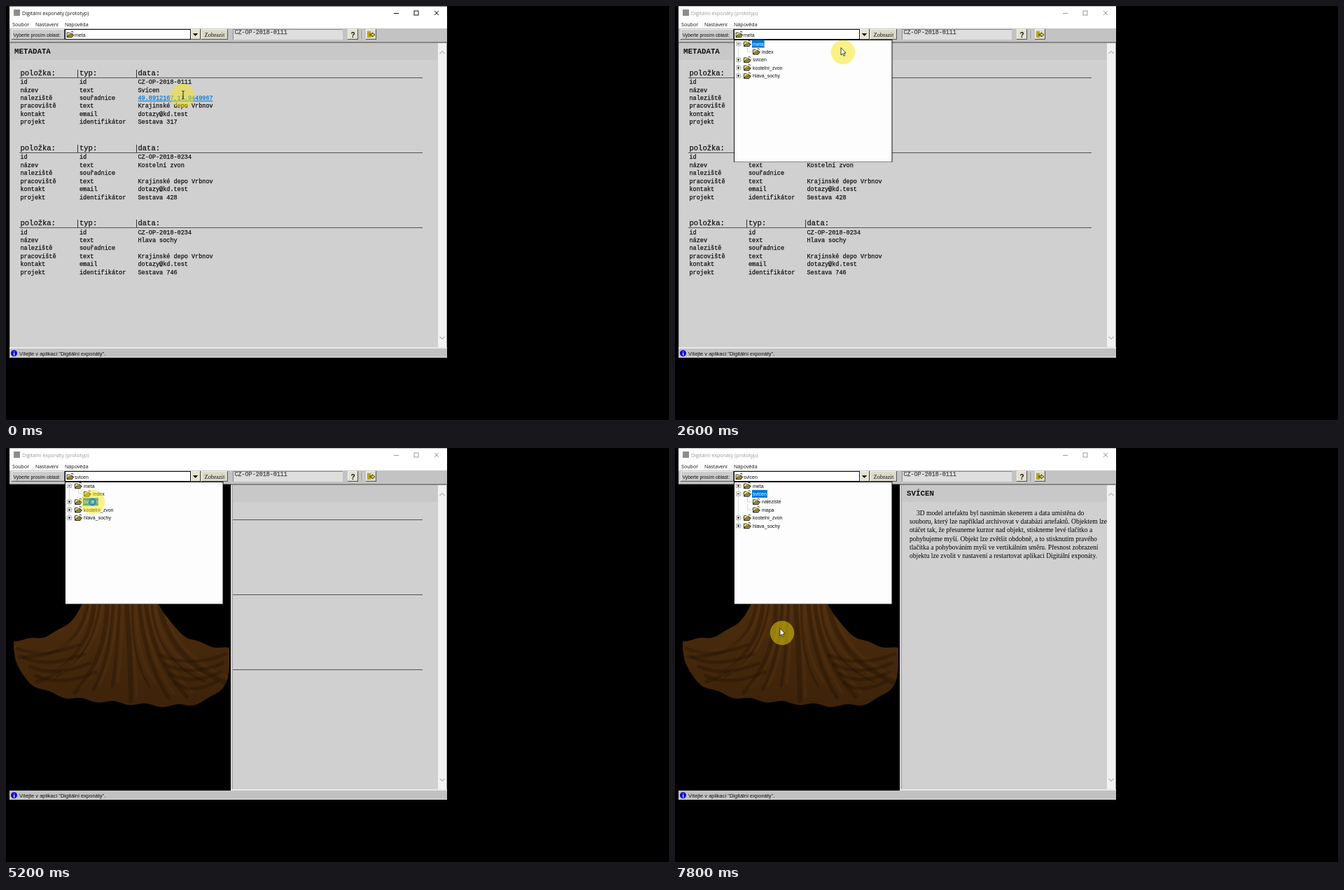
Write an HTML page with a canvas that moves like this. It is 947 px wide and 591 px high and loops after 8 s.

```html
<!DOCTYPE html>
<html lang="cs">
<head>
<meta charset="utf-8">
<title>Digitální exponáty</title>
<style>
html, body { margin: 0; width: 100%; height: 100%; overflow: hidden; background: #000; }
canvas { display: block; }
</style>
</head>
<body>
<canvas id="stage" width="947" height="591"></canvas>
<script>
const ctx = document.getElementById('stage').getContext('2d');
const LOOP = 8000, STEP = 200;
const APP = 'Digitální exponáty';
const SANS = '"Liberation Sans", Arial, sans-serif';
const HUMAN = '"Open Sans", sans-serif';
const SERIF = '"Liberation Serif", serif';
const MONO = '"Liberation Mono", monospace';
const INK = '#111', BLUE = '#0078d7';
const ROW = 11.42;

// Moments of the hard changes
const OPEN = 1400, RELEASE = 2000, SELECT = 4000, PANE = 4400, MODEL = 4600, EXPAND = 5600;

// Pointer stops: time, x, y
const STOPS = [
  [0, 252, 128], [200, 250, 145], [1000, 279, 50], [1800, 279, 50],
  [2600, 240, 66], [3400, 127, 84], [4600, 127, 84], [5200, 124, 77],
  [6200, 124, 77], [7800, 153, 264], [LOOP, 153, 264]
];

const BLOCKS = [
  ['CZ-OP-2018-0111', 'Svícen', '49.8912167,17.9449967', 'Sestava 317'],
  ['CZ-OP-2018-0234', 'Kostelní zvon', '', 'Sestava 428'],
  ['CZ-OP-2018-0234', 'Hlava sochy', '', 'Sestava 746']
];
const FIELDS = [
  ['id', 'id'], ['název', 'text'], ['naleziště', 'souřadnice'],
  ['pracoviště', 'text'], ['kontakt', 'email'], ['projekt', 'identifikátor']
];
const ABOUT = [
  '3D model artefaktu byl nasnímán skenerem a data umístěna do',
  'souboru, který lze například archivovat v databázi artefaktů. Objektem lze',
  'otáčet tak, že přesuneme kurzor nad objekt, stiskneme levé tlačítko a',
  'pohybujeme myší. Objekt lze zvětšit obdobně, a to stisknutím pravého',
  'tlačítka a pohybováním myši ve vertikálním směru. Přesnost zobrazení',
  'objektu lze zvolit v nastavení a restartovat aplikaci ' + APP + '.'
];

function rect(x, y, w, h, color) {
  ctx.fillStyle = color;
  ctx.fillRect(x, y, w, h);
}

function text(str, x, y, size, family, color = INK, weight = '') {
  ctx.font = `${weight} ${size}px ${family}`;
  ctx.fillStyle = color;
  ctx.fillText(str, x, y);
}

// Typewriter text, slightly heavier than regular
function mono(str, x, y, size = 8.5, color = INK) {
  text(str, x, y, size, MONO, color);
  ctx.strokeStyle = color;
  ctx.lineWidth = 0.25;
  ctx.strokeText(str, x, y);
}

function line(points, color, width = 1) {
  ctx.beginPath();
  points.forEach(([x, y]) => ctx.lineTo(x, y));
  ctx.strokeStyle = color;
  ctx.lineWidth = width;
  ctx.stroke();
}

function dotted(points) {
  ctx.setLineDash([1, 1]);
  line(points, '#999', 0.7);
  ctx.setLineDash([]);
}

function poly(points, fill) {
  ctx.beginPath();
  points.forEach(([x, y]) => ctx.lineTo(x, y));
  ctx.closePath();
  ctx.fillStyle = fill;
  ctx.fill();
  ctx.strokeStyle = INK;
  ctx.lineWidth = 0.8;
  ctx.stroke();
}

function disc(x, y, r, color) {
  ctx.beginPath();
  ctx.arc(x, y, r, 0, Math.PI * 2);
  ctx.fillStyle = color;
  ctx.fill();
}

function at(x, y, draw) {
  ctx.save();
  ctx.translate(x, y);
  draw();
  ctx.restore();
}

function bevel(x, w, fill) {
  rect(x, 33, w, 15, '#555');
  rect(x, 33, w - 1, 14, '#f4f4f4');
  rect(x + 1, 34, w - 2, 13, fill);
}

function folder(x, y) {
  at(x, y, () => {
    poly([[-4.5, 3.5], [-4.5, -3], [-1, -3], [0, -2], [3, -2], [3, 3.5]], '#f3ea8c');
    poly([[-4.5, 3.5], [-2, 0], [5.5, 0], [3, 3.5]], '#a99d2c');
    line([[1.5, -4.5], [4, -4.5], [4.5, -3]], INK, 0.7);
  });
}

function titleBar(active) {
  const ink = active ? INK : '#999';
  rect(5, 0, 625, 32, '#fff');
  rect(5, 0, 625, 1, active ? '#777' : '#bbb');
  rect(11, 5, 9, 9, '#8c8c8c');
  text(APP + ' (prototyp)', 23, 12.7, 7.2, HUMAN, ink);
  line([[554, 10.5], [561, 10.5]], ink);
  ctx.strokeRect(583, 7, 6, 6);
  line([[612, 7], [618, 13]], ink);
  line([[618, 7], [612, 13]], ink);
  text('Soubor', 9, 28.5, 7.1, HUMAN);
  text('Nastavení', 42, 28.5, 7.1, HUMAN);
  text('Nápověda', 84, 28.5, 7.1, HUMAN);
}

function toolBar(area, pressed) {
  rect(5, 32, 625, 20, '#c3c3c3');
  rect(5, 51, 625, 2, '#858585');
  bevel(8, 76, '#cbcbcb');
  text('Vyberte prosím oblast:', 10.5, 43.7, 6.75, SANS);
  rect(84, 33, 180, 15, INK);
  rect(85, 34, 178, 13, '#fff');
  folder(91.5, 41);
  text(area, 98, 43.7, 7, SANS);
  bevel(264, 14, pressed ? '#c9c6b0' : '#e6e3cf');
  if (pressed) rect(264, 33, 1, 15, INK);
  at(pressed ? 271.5 : 270.5, pressed ? 41.5 : 41, () =>
    poly([[-3, -1.5], [3, -1.5], [0, 1.5]], INK));
  bevel(279, 38, '#dcd9c8');
  text('Zobrazit', 283.5, 43.5, 8.5, SERIF);
  rect(324, 33, 157, 15, '#8d8d8d');
  rect(325, 34, 156, 14, '#dedede');
  mono('CZ-OP-2018-0111', 326.5, 40.3, 8.4, '#444');
  bevel(488, 15, '#e4e1cf');
  text('?', 492.5, 44.7, 10, SANS, INK, 'bold');
  rect(508, 35, 1, 12, '#888');
  rect(509, 35, 1, 12, '#eee');
  bevel(514, 15, '#dddac8');
  rect(516, 36, 5, 9, '#b5a620');
  poly([[520, 40], [523, 40], [523, 38], [527, 41], [523, 44], [523, 42], [520, 42]], '#f2df35');
}

function contentPane() {
  rect(5, 53, 625, 436, '#a8a8a8');
  rect(6, 53, 611, 434, '#d0d0d0');
  rect(6, 53, 611, 24, '#c8c8c8');
  rect(617, 53, 12, 434, '#f2f2f2');
  line([[619.5, 68], [623, 64.5], [626.5, 68]], '#8c8c8c');
  line([[619.5, 472], [623, 475.5], [626.5, 472]], '#8c8c8c');
}

function metadata() {
  text('METADATA', 12, 67.5, 10.8, MONO, INK, 'bold');
  const columns = [20.5, 105, 188.5];
  BLOCKS.forEach(([id, name, place, project], b) => {
    const top = 95.5 + b * 107.2;
    ['položka:', 'typ:', 'data:'].forEach((label, i) => {
      mono(label, columns[i], top + 3, 10.5);
      if (i) rect(Math.floor(columns[i] - 2.5), Math.round(top - 5), 1, 12, '#333');
    });
    rect(19, Math.round(top + 6), 576, 1, '#555');
    const data = [id, name, place, 'Krajinské depo Vrbnov', 'dotazy@kd.test', project];
    FIELDS.forEach((field, i) => {
      const y = top + 15.7 + i * ROW;
      const link = data[i] && data[i] === place;
      [...field, data[i]].forEach((cell, c) =>
        mono(cell, columns[c], y, 8.5, link && c === 2 ? BLUE : INK));
      if (link) rect(188.5, y + 1.2, 107, 1, BLUE);
    });
  });
}

function about() {
  text('SVÍCEN', 331, 67.5, 10.8, MONO, INK, 'bold');
  ABOUT.forEach((row, i) => text(row, i ? 335 : 345, 96.2 + i * 12.12, 9.5, SERIF, '#000'));
}

// Upper and lower edge of the draped foot, u from -1 (left) to 1 (right)
const footX = u => 165 + 154 * u;
const upperY = u => 215 + 6 * u + 68 * (1 - Math.exp(-5 * Math.max(0, Math.abs(u) - 0.33)));
const lowerY = u => 300 + 12 * u + 64 * Math.sqrt(1 - u ** 4) + 2 * Math.sin(21 * u);

function fold(x0, y0, cx, cy, x1, y1, color, width) {
  ctx.beginPath();
  ctx.moveTo(x0, y0);
  ctx.quadraticCurveTo(cx, cy, x1, y1);
  ctx.strokeStyle = color;
  ctx.lineWidth = width;
  ctx.stroke();
}

function model() {
  ctx.save();
  ctx.beginPath();
  for (let u = -1; u <= 1; u += 1 / 64) ctx.lineTo(footX(u), upperY(u) + 1.5 * Math.sin(24 * u));
  for (let u = 1; u >= -1; u -= 1 / 64) ctx.lineTo(footX(u), lowerY(u));
  ctx.closePath();
  const tone = ctx.createLinearGradient(0, 222, 0, 368);
  tone.addColorStop(0, '#4c2d0d');
  tone.addColorStop(1, '#3d230a');
  ctx.fillStyle = tone;
  ctx.fill();
  ctx.clip();
  ctx.lineCap = 'round';
  const dark = 'rgba(24,12,3,.28)', light = 'rgba(100,60,20,.2)';
  // Drapery spreading from the narrow top
  for (let i = 0; i < 12; i++) {
    const u = i / 5.5 - 1, sway = Math.sin(i * 2.4);
    const x0 = 167 + 50 * u, cx = 167 + 58 * u + 6 * sway;
    const x1 = footX(u * 0.95), y1 = lowerY(u * 0.95) - 16 + 10 * sway;
    fold(x0, 215, cx, 300, x1, y1, dark, 5 + 2 * sway);
    fold(x0 + 5, 215, cx + 6, 296, x1 + 8, y1 - 6, light, 4);
  }
  // Rolled edges on both sides
  for (let i = 0; i < 4; i++) {
    const y = 290 + i * 13;
    fold(16 + i * 9, y - 4, 50 + i * 10, y + 12, 104 + i * 8, y - 9, dark, 5);
    fold(220 + i * 7, y + 6, 265, y + 24, 314 - i * 4, y + 4, dark, 5);
  }
  ctx.restore();
}

function modelPane(loaded) {
  rect(5, 52, 316, 437, '#000');
  rect(321, 53, 2, 434, '#d0d0d0');
  rect(323, 53, 1, 434, '#a0a0a0');
  if (loaded) model();
}

function statusBar() {
  rect(5, 487, 625, 2, '#e8e8e8');
  rect(5, 489, 625, 13, '#c1c1c1');
  rect(5, 501, 625, 1, '#e8e8e8');
  disc(11.5, 495.7, 4.5, '#0a0ad0');
  text('i', 10.4, 498.7, 8, SERIF, '#fff', 'bold');
  text(`Vítejte v aplikaci "${APP}".`, 19, 498.5, 7.5, SANS);
}

function tree(expanded, selected, hovered) {
  rect(84, 48, 226.5, 175, INK);
  rect(85, 49, 224.5, 173.5, '#fdfdfd');
  const nodes = expanded
    ? ['+meta', '-svicen', ' naleziste', ' mapa', '+kostelni_zvon', '+hlava_sochy']
    : ['-meta', ' index', '+svicen', '+kostelni_zvon', '+hlava_sochy'];
  const rowY = i => 54 + i * ROW;
  dotted([[90.5, rowY(0)], [90.5, rowY(nodes.length - 1)]]);
  nodes.forEach((node, i) => {
    const y = rowY(i), sign = node[0], name = node.slice(1);
    const child = sign === ' ';
    const x = child ? 124 : 111;
    if (child) {
      dotted([[103.5, y - 7], [103.5, y], [111, y]]);
    } else {
      dotted([[93, y], [98, y]]);
      rect(87.5, y - 3, 6, 6, '#888');
      rect(88.2, y - 2.3, 4.6, 4.6, '#fff');
      rect(89, y - 0.5, 3, 1, INK);
      if (sign === '+') rect(90, y - 1.5, 1, 3, INK);
    }
    folder(x - 8, y);
    ctx.font = `7px ${SANS}`;
    const width = ctx.measureText(name).width;
    const on = name === selected, hot = name === hovered;
    if (on) rect(x - 1, y - 5.5, width + 2, 11, BLUE);
    const ink = on ? '#fff' : hot ? '#16788a' : INK;
    text(name, x, y + 2.5, 7, SANS, ink);
    if (hot) rect(x, y + 3.5, width, 0.8, ink);
  });
}

function pointerAt(t) {
  const i = STOPS.findIndex(stop => stop[0] > t);
  const [t0, x0, y0] = STOPS[i - 1], [t1, x1, y1] = STOPS[i];
  const k = ((t - t0) / (t1 - t0)) ** 1.32;
  return [x0 + (x1 - x0) * k, y0 + (y1 - y0) * k];
}

const CURSORS = {
  arrow() {
    poly([[-3, -6.5], [-3, 4], [-0.6, 2], [1, 5.4], [2.6, 4.7], [1, 1.3], [4.2, 1]], '#fff');
  },
  beam() {
    line([[-1, -7], [1, -6], [3, -7]], INK, 0.8);
    line([[1, -6], [1, 4]], INK, 0.9);
    line([[-1, 5], [1, 4], [3, 5]], INK, 0.8);
  },
  hand() {
    poly([[-3, -6], [-2, -7], [-1, -6], [-1, -2], [4, -1], [5, 0], [4, 6], [-1.5, 6], [-5, 1], [-3, 1]], '#fff');
    line([[1, -1.5], [1, 0.5]], INK, 0.6);
    line([[3, -1], [3, 0.5]], INK, 0.6);
  },
  wait() {
    ctx.beginPath();
    ctx.arc(-0.5, 0, 4.2, 0, Math.PI * 2);
    ctx.strokeStyle = '#2a8fd0';
    ctx.lineWidth = 2.6;
    ctx.stroke();
  }
};

function cursorKind(t, y) {
  if (t < OPEN) return y > 60 ? 'beam' : 'arrow';
  if (t >= PANE && t < EXPAND) return 'wait';
  return t >= 3200 && t < 6800 ? 'hand' : 'arrow';
}

function hoveredNode(t) {
  if (t >= 3400 && t < PANE) return 'svicen';
  if (t >= EXPAND && t < 6400) return 'naleziste';
  return t >= 6400 && t < 6800 ? 'mapa' : '';
}

function render(t) {
  rect(0, 0, 947, 591, '#000');
  titleBar(t < OPEN);
  toolBar(t < PANE ? 'meta' : 'svicen', t >= OPEN && t < RELEASE);
  contentPane();
  if (t < EXPAND) metadata(); else about();
  statusBar();
  if (t >= PANE) modelPane(t >= MODEL);
  if (t >= OPEN) tree(t >= EXPAND, t < SELECT ? 'meta' : 'svicen', hoveredNode(t));
  const [x, y] = pointerAt(t);
  disc(x, y, 17.3, 'rgba(247,230,8,.48)');
  at(x, y, CURSORS[cursorKind(t, y)]);
}

function frame(now) {
  const t = now % LOOP;
  render(Math.floor(t / STEP) * STEP);
  requestAnimationFrame(frame);
}
render(0);
requestAnimationFrame(frame);
</script>
</body>
</html>
```
